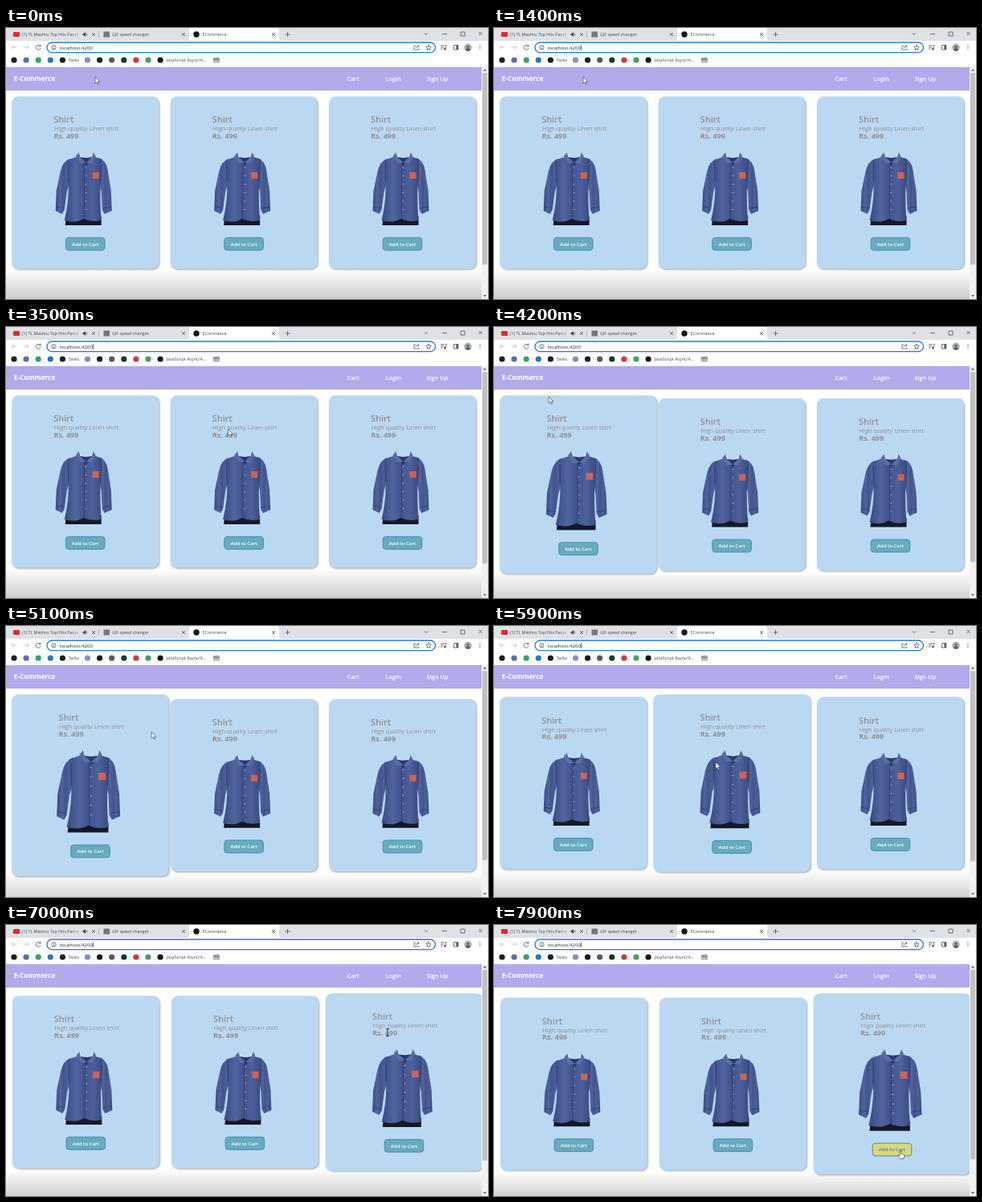
An HTML page for the animation above (8000 ms loop, 600 px wide and 338 px high).

```html
<!DOCTYPE html>
<html lang="en">
<head>
<meta charset="utf-8">
<title>ECommerce</title>
<style>
html, body { margin: 0; width: 100%; height: 100%; overflow: hidden; background: #fff; }
svg { display: block; }
text { font-family: "Open Sans", "Noto Sans", sans-serif; }
.ui text { font-size: 5.3px; fill: #45484c; }
.ui .url { font-size: 6.1px; fill: #27292c; }
.line { fill: none; stroke: #505357; stroke-width: .8; }
.faint { stroke: #b5b8bc; }
.solid { fill: #505357; }
.nav text { fill: #fff; font-size: 7.4px; font-weight: 600; }
.nav .brand { font-size: 8.3px; font-weight: 700; }
.panel { fill: #bbd8f2; filter: drop-shadow(1px 1.2px 1.3px rgba(70, 70, 80, .48)); }
.info { fill: #959092; }
.name { font-size: 11px; font-weight: 600; }
.desc { font-size: 7.5px; }
.price { font-size: 9.1px; font-weight: 700; }
.btn rect { fill: #68aabf; stroke: #4590b4; }
.btn text { fill: #fff; font-size: 6.1px; font-weight: 600; text-anchor: middle; }
.btn.hot rect { fill: #d8d87c; stroke: #4a8fae; }
.btn.hot text { fill: #4a86b8; }
.track { fill: #f1f1f1; }
.thumb { fill: #c1c1c1; }
.arrow { fill: #606060; }
</style>
</head>
<body>
<svg width="600" height="338" viewBox="0 0 600 338">
  <defs>
    <linearGradient id="fade" x2="0" y2="1">
      <stop stop-color="#fff"/><stop offset="1" stop-color="#c9c9c9"/>
    </linearGradient>
    <linearGradient id="cloth">
      <stop stop-color="#3b4b82"/><stop offset=".3" stop-color="#50649f"/>
      <stop offset=".5" stop-color="#43548d"/><stop offset=".75" stop-color="#4d609b"/>
      <stop offset="1" stop-color="#3a4980"/>
    </linearGradient>
    <g id="shirt">
      <path fill="#151827" d="M-24 80H20V91H-25Z"/>
      <g fill="url(#cloth)">
        <path d="M-19 8Q-28 11-31 24L-36 48L-37 73L-29 77L-26 72L-23 50L-18 32Z"/>
        <path d="M17 7Q26 10 28 22L32 48L33 73L24 77L21 72L20 50L17 32Z"/>
        <path d="M-9 5L-23 10L-21 38Q-20 60-26 85Q-12 89-2 83Q8 88 20 85Q18 60 19 38L21 9L10 5L0 14Z"/>
      </g>
      <path fill="#2b3866" d="M-8 5Q1 9 10 5L1 17Z"/>
      <path fill="#596da8" d="M-8 0L-12 5L-6 14L1 13L-6 6ZM10 0L13 5L8 14L1 13L8 6Z"/>
      <path fill="#e9edf4" d="M-8 0L-6 6L-4 6ZM10 0L8 6L6 6Z"/>
      <path fill="none" stroke="#303d70" stroke-width=".8" d="M-21 15L-21 38M20 15L19 38M-1 15V83M-36 68L-27 70M32 68L22 70"/>
      <path fill="none" stroke="#cfd5e6" stroke-width="1.200" stroke-linecap="round" stroke-dasharray="0 10.500" d="M1 19V82"/>
      <path fill="#cf6254" d="M9 25H17V33H9Z"/>
    </g>
    <path id="close" class="line" d="M-2-2L2 2M2-2L-2 2"/>
  </defs>

  <rect id="shade" y="301" width="592" height="39" fill="url(#fade)"/>
  <g id="cards"></g>

  <g class="nav">
    <rect y="48.500" width="592" height="29.500" fill="#b1aaeb"/>
    <text class="brand" x="9.700" y="66">E-Commerce</text>
    <text x="424.500" y="65.500">Cart</text>
    <text x="472.500" y="65.500">Login</text>
    <text x="523.500" y="65.500">Sign Up</text>
  </g>

  <rect class="track" x="592" y="48.500" width="8" height="289.500"/>
  <rect class="thumb" id="vthumb" x="593" y="56" width="6"/>
  <path class="arrow" d="M594 53.500L596 51L598 53.500Z"/>
  <path class="arrow" id="down" d="M594 333L596 335.500L598 333Z"/>
  <g id="hbar">
    <rect class="track" y="331" width="592" height="7"/>
    <rect x="592" y="331" width="8" height="7" fill="#dcdcdc"/>
    <rect class="thumb" x="8" y="332" width="574" height="5"/>
    <path class="arrow" d="M5 332.500L2.500 334.500L5 336.500ZM586 332.500L588.500 334.500L586 336.500Z"/>
  </g>

  <g class="ui">
    <rect width="600" height="48.500" fill="#fff"/>
    <path fill="#dee1e6" d="M0 0H600V16H344Q340 16 340 12V3Q340 0 337 0H231Q228 0 228 3V12Q228 16 224 16H0Z"/>
    <path stroke="#9a9da2" stroke-width=".6" d="M115.500 4V12"/>
    <rect x="9" y="5" width="8" height="6" rx="1" fill="#e8282b"/>
    <svg x="20" width="70" height="16"><text y="10">(1) TL Meshru Top Hits Parade</text></svg>
    <rect x="84" y="4" width="7" height="9" fill="#dee1e6" opacity=".55"/>
    <path fill="#3c4043" d="M95.500 7H97L99 5V11L97 9H95.500Z"/>
    <path class="line" d="M100 6.300Q101.600 8 100 9.700"/>
    <use href="#close" x="109" y="8"/>
    <rect x="121.500" y="4.500" width="7.500" height="7" fill="#74777c"/>
    <text x="132" y="10">GIF speed changer</text>
    <use href="#close" x="221" y="8"/>
    <circle cx="237" cy="8" r="3.700" fill="#17181b"/>
    <text x="244.500" y="10">ECommerce</text>
    <use href="#close" x="333" y="8"/>
    <path class="line" d="M347.500 8H353.500M350.500 5V11M521 6.500L523 8.500L525 6.500M543 7.500H549M566 5H571V10H566Z"/>
    <use href="#close" x="590.500" y="7"/>

    <path class="line faint" d="M13.500 24H7.500M10 21.300L7.300 24L10 26.700M22 24H28M25.500 21.300L28.200 24L25.500 26.700"/>
    <path class="line" d="M42.300 22.300A2.900 2.900 0 1 0 43 25M43 20.700V23H40.700"/>
    <rect x="51" y="18" width="483.500" height="12.700" rx="6.350" fill="#fff" stroke="#2a78d6" stroke-width="1.300"/>
    <circle class="line" cx="59.500" cy="24.300" r="2.600"/>
    <path class="line" d="M59.500 24V26M59.500 22.500V23.200"/>
    <text class="url" x="66.800" y="26.600">localhost:4200</text>
    <rect id="caret" x="108.300" y="21" width=".7" height="7" fill="#333"/>
    <path class="line" d="M510 22H508V27H514V25.500M510 25Q510.500 22.500 514 22.500M512.300 20.800L514.200 22.500L512.300 24.200"/>
    <path class="line" d="M526 20.800L527 23.200L529.300 23.400L527.500 25L528.100 27.300L526 26L523.900 27.300L524.500 25L522.700 23.400L525 23.200Z"/>
    <path class="line" d="M541 21.800H546M541 24H545M541 26.200H543.500M547.300 26V21.500H549"/>
    <circle class="solid" cx="546.300" cy="26.200" r="1.200"/>
    <path class="line" d="M557.500 21.500H562.800V27H557.500Z"/>
    <path class="solid" d="M560.500 21.500H563V27H560.500Z"/>
    <circle cx="575" cy="24.300" r="4.700" fill="#a9b1aa"/>
    <path fill="#5d625f" d="M572 28Q572 25 575 25Q578 25 578 28Q575 29.500 572 28Z"/>
    <circle cx="575" cy="23.300" r="1.500" fill="#5d625f"/>
    <path stroke="#505357" stroke-width="1.300" stroke-linecap="round" stroke-dasharray="0 2.300" d="M590 22V27"/>
    <g id="marks"></g>
    <text x="77.800" y="42">Tasks</text>
    <text x="199.800" y="42">JavaScript Async/A...</text>
    <path fill="#b4b6b9" d="M258 37L265 36V38H266V43.500H258Z"/>
    <path class="line" d="M258 39H266"/>
  </g>

  <g id="pointer" stroke="#333" stroke-width=".6" stroke-linejoin="round">
    <path id="arrow" fill="#fff" d="M0 0V8L1.900 6.300L3.200 9.200L4.600 8.600L3.300 5.800H5.800Z"/>
    <path id="beam" fill="none" stroke-width="1" d="M-2-4.500H2M0-4.500V4.500M-2 4.500H2"/>
    <path id="hand" fill="#fff" d="M-.8 0Q0-1 .8 0V3.500L4 4.200Q5 4.500 4.800 6L4 9.500H-.5L-3 6Q-3.300 4.800-2 5L-.8 6Z"/>
  </g>
</svg>
<script>
const $ = id => document.getElementById(id);
const LOOP = 8000, STEP = 100, BLINK = 530, RELEASE = 250, MAX_GROWTH = 19;

const markColors = ['#1b1f23', '#5b6fb5', '#36a269', '#2179c4', '#1b1f23', '#7e93bd',
  '#15171c', '#55585c', '#173b2a', '#d63445', '#4b9d62', '#15171c'];
$('marks').innerHTML = markColors.map((fill, i) =>
  `<circle cx="${10 + 15.1 * i + (i > 4 ? 16 : 0)}" cy="40" r="3.600" fill="${fill}"/>`).join('');

$('cards').innerHTML = `<g class="card">
  <rect class="panel" rx="8"/>
  <g class="info">
    <text class="name" x="-39.500" y="33">Shirt</text>
    <text class="desc" x="-39" y="43">High quality Linen shirt</text>
    <text class="price" x="-39.300" y="52.500">Rs. 499</text>
  </g>
  <use class="pic" href="#shirt"/>
  <g class="btn"><rect x="-24.300" y=".3" width="48.600" height="15.800" rx="3.500"/><text y="10.500">Add to Cart</text></g>
</g>`.repeat(3);
const cards = [...document.querySelectorAll('.card')].map(el => {
  const [panel, pic, btn] = ['.panel', '.pic', '.btn'].map(s => el.querySelector(s));
  return { el, panel, pic, btn };
});

// When the pointer is over a card, and how fast that card swells
const visits = [
  { card: 2, from: 2450, to: 3150, pull: 32 },
  { card: 0, from: 3610, to: 5230, pull: 9.5 },
  { card: 1, from: 5460, to: 6520, pull: 9.5 },
  { card: 2, from: 6600, to: LOOP, pull: 9.5 }
];

// Pointer rests: time, x, y
const rests = [[1800, 111, 61], [2800, 485, 168], [4200, 68, 87],
  [5900, 276, 170], [7000, 475, 134], [7900, 506, 282]];

const clamp = v => Math.min(1, Math.max(0, v));
const ease = v => v * v * (3 - 2 * v);
const show = (id, on) => { $(id).style.display = on ? '' : 'none'; };
const move = (el, x, y, more = '') => el.setAttribute('transform', `translate(${x} ${y})${more}`);

function pointerAt(t) {
  const next = rests.findIndex(r => r[0] > t);
  if (next < 1) return rests.at(next).slice(1);
  const [t0, x0, y0] = rests[next - 1], [t1, x1, y1] = rests[next];
  const p = ease((t - t0) / (t1 - t0));
  return [x0 + (x1 - x0) * p, y0 + (y1 - y0) * p];
}

function hoverState(t) {
  const over = [0, 0, 0], growth = [0, 0, 0];
  for (const { card, from, to, pull } of visits) {
    if (t < from) continue;
    const left = 1 - clamp((t - to) / RELEASE);
    const held = Math.sqrt((Math.min(t, to) - from) / 1000);
    over[card] += clamp((t - from) / 150) * left;
    growth[card] += Math.min(MAX_GROWTH, pull * held) * left;
  }
  return { over, growth };
}

function draw(t) {
  const { over, growth } = hoverState(t);
  const tallest = Math.max(...growth);
  const pressed = t >= 7600;

  cards.forEach(({ el, panel, pic, btn }, i) => {
    const g = growth[i], w = 183 + 12.5 * over[i];
    // The first card swells from its left edge; the last one pushes the row right
    const push = (i === 0 ? 6.2 * over[0] : 0) + (.6 + .7 * i) * over[2];
    move(el, 98.7 + 197.4 * i + push, 85.4 + (tallest - g) / 2);
    panel.setAttribute('x', -w / 2);
    panel.setAttribute('width', w);
    panel.setAttribute('height', 215 + g);
    move(pic, 0, 69.5, ` scale(${1 + g / 91})`);
    move(btn, 0, 175.7 + g);
    btn.classList.toggle('hot', i === 2 && pressed);
  });

  const wide = growth[2] > 12;
  show('hbar', wide);
  move($('down'), 0, wide ? -8 : 0);
  $('vthumb').setAttribute('height', 239 - tallest * .25 - (wide ? 16 : 0));
  move($('shade'), 0, tallest * .55);
  show('caret', (t + 2 * BLINK - 180) % (2 * BLINK) < BLINK);

  const reading = t >= 6900 && t < 7200;
  show('arrow', !reading && !pressed);
  show('beam', reading);
  show('hand', pressed);
  move($('pointer'), ...pointerAt(t));
}

function tick() {
  const t = performance.now() % LOOP;
  draw(Math.floor(t / STEP) * STEP);
  requestAnimationFrame(tick);
}
tick();
</script>
</body>
</html>
```
